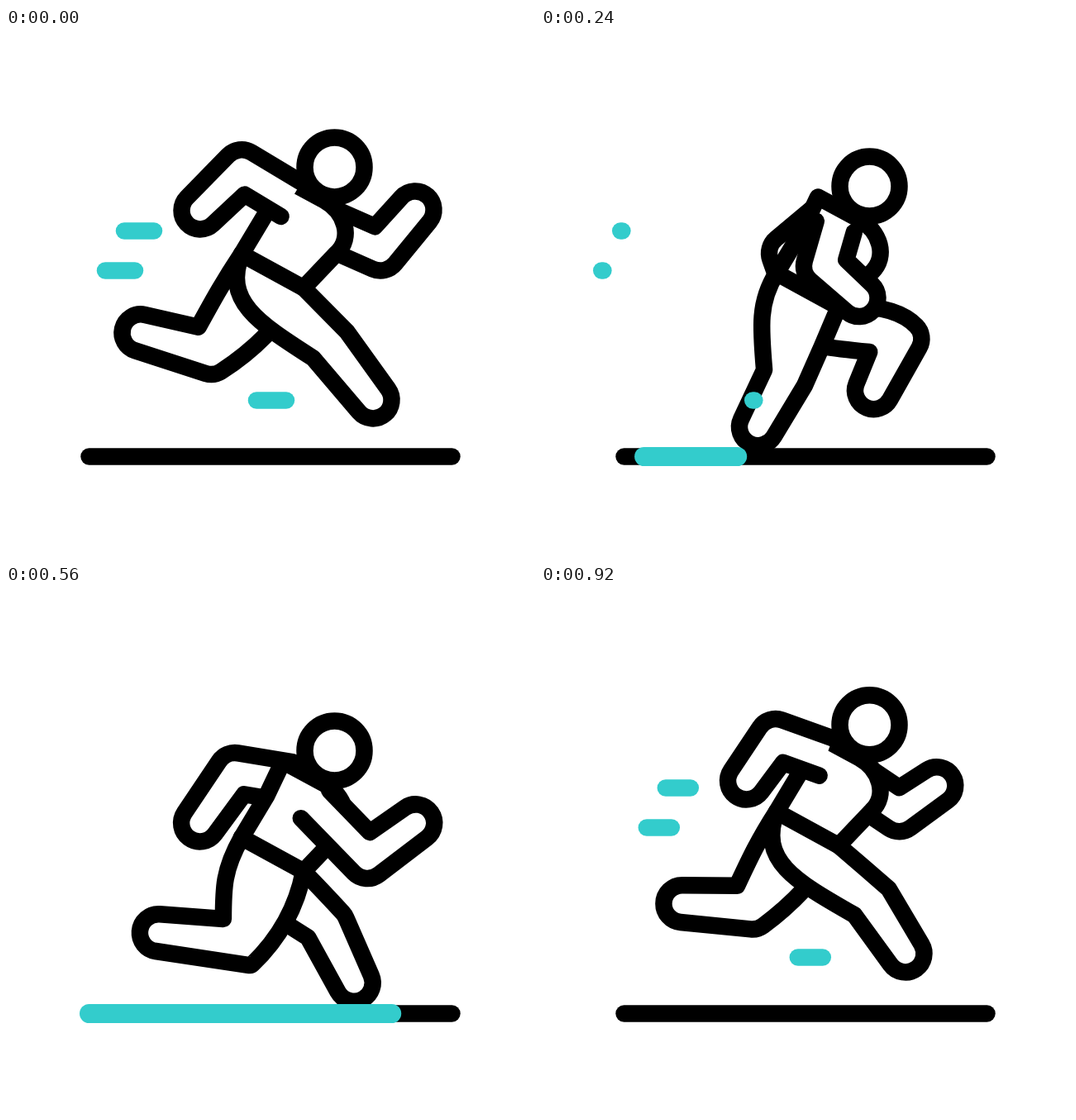
An HTML page with a canvas that plays this animation: 640 by 640 pixels, repeating every 960 ms.

```html
<!DOCTYPE html>
<html lang="en">
<head>
<meta charset="utf-8">
<title>Runner</title>
<style>
  html, body { margin: 0; width: 100%; height: 100%; overflow: hidden; background: #fff; }
  canvas { display: block; }
</style>
</head>
<body>
<canvas id="stage" width="640" height="640"></canvas>
<script>
const ctx = document.getElementById('stage').getContext('2d');
const LOOP = 960, STEP = 40, LINE = 20.5, TEAL = '#33cccc';

// A cyclic motion: mean value, then cosine and sine amplitude of each harmonic.
const wave = (mean, ...amps) => angle => amps.reduce((sum, amp, i) =>
  sum + amp * (i % 2 ? Math.sin : Math.cos)(angle * (1 + (i >> 1))), mean);
const path = (x, y) => angle => ({ x: x(angle), y: y(angle) });

// Both legs and both arms share one stride, half a loop apart.
const knee = path(wave(344, 75, -53, -23, 5, 0, 15.5, -4, -6),
                  wave(383, -10, 13, 4, 6, 6, -7.5, -1, -2));
const foot = path(wave(315, 142.5, -50, -14.5, -4, -2, 20, 3),
                  wave(426, 24, 21, -14, -5, 16.5, -1, -4, 1));
const elbow = path(wave(340, -84, 9, 24, 9, 0, -12, 5),
                   wave(249, -53, 1, -18.5, 2, 4, -6.5, -11.5, -2));
const hand = path(wave(359, -134, 13, 7, 3.5, 4, -21, -1, -1),
                  wave(274, -4, 3, -41, 0, 4.5, 2, -14, -7));
const bob = wave(24.6, -7.7, -0.2, -4.1, 8.8, -5.2, 1.4, -3.1, -0.7, -3.1, 0.6);

const hip = { x: 322, y: 292 }, hipBack = { x: 285, y: 272 }, hipFront = { x: 360, y: 313 };

const along = (p, v, k) => ({ x: p.x + v.x * k, y: p.y + v.y * k });
const mix = (p, q, k) => ({ x: p.x + (q.x - p.x) * k, y: p.y + (q.y - p.y) * k });

// Unit vector to the outer side of the bone from p to q.
function outward(p, q, turn) {
  const length = Math.hypot(q.x - p.x, q.y - p.y);
  return { x: turn * (p.y - q.y) / length, y: turn * (q.x - p.x) / length };
}

// Inner and outer corner where two bones of the given half width meet.
function bend(root, joint, end, width, turn) {
  const n1 = outward(root, joint, turn), n2 = outward(joint, end, turn);
  const cos = n1.x * n2.x + n1.y * n2.y;
  const reach = width / Math.max(0.5, 1 + cos);
  const miter = { x: n1.x + n2.x, y: n1.y + n2.y };
  return {
    inner: along(joint, miter, -reach),
    outer: along(joint, miter, reach),
    normal: n1, cos,
  };
}

// Round end of a limb, tangent to the lines from inner and to outer.
function tip(inner, center, radius, outer, turn) {
  const tangent = (p, side) => Math.atan2(p.y - center.y, p.x - center.x) + side
    * Math.acos(Math.min(1, radius / Math.hypot(p.x - center.x, p.y - center.y)));
  ctx.arc(center.x, center.y, radius, tangent(inner, turn), tangent(outer, -turn), turn < 0);
}

function shape(trace) {
  ctx.beginPath();
  trace();
  ctx.fill();
  ctx.stroke();
}

function drawArm(angle) {
  const e = elbow(angle), h = hand(angle), swing = e.x - 285;
  const shoulder = { x: 345 + 0.19 * swing, y: 206 + 0.17 * swing };
  const { inner, outer, normal } = bend(shoulder, e, h, 24, 1);
  const from = along(shoulder, normal, -24), to = along(shoulder, normal, 24);
  shape(() => {
    ctx.moveTo(from.x, from.y);
    ctx.lineTo(inner.x, inner.y);
    tip(inner, h, 22.5, outer, 1);
    ctx.arcTo(outer.x, outer.y, to.x, to.y, 23);
    ctx.lineTo(to.x, to.y);
  });
}

function drawLeg(angle, kneeRadius) {
  const k = knee(angle), f = foot(angle);
  const { inner, outer, normal, cos } = bend(hip, k, f, 26, -1);
  const lift = (inner.x - hipBack.x + 150) / (inner.y - hipBack.y);
  const seat = { x: hipBack.x - 22, y: hipBack.y + 30 * lift };
  const ham = mix(seat, inner, 0.37);
  const thigh = along(mix(outer, hipFront, 0.5), normal, 28 * (1 - cos));
  shape(() => {
    ctx.moveTo(hipBack.x, hipBack.y);
    ctx.bezierCurveTo(seat.x, seat.y, ham.x, ham.y, inner.x, inner.y);
    tip(inner, f, 22.5, outer, -1);
    ctx.arcTo(outer.x, outer.y, thigh.x, thigh.y, kneeRadius);
    ctx.quadraticCurveTo(thigh.x, thigh.y, hipFront.x, hipFront.y);
  });
}

function drawTorso() {
  shape(() => {
    ctx.moveTo(335, 180);
    ctx.lineTo(385, 207);
    ctx.bezierCurveTo(410, 221, 420, 252, 400, 271);
    ctx.lineTo(hipFront.x, hipFront.y);
    ctx.lineTo(hipBack.x, hipBack.y);
    ctx.lineTo(315, 222);
    ctx.closePath();
  });
}

function drawRunner(angle) {
  ctx.save();
  ctx.translate(0, bob(angle));
  ctx.lineWidth = LINE;
  ctx.strokeStyle = '#000';
  ctx.fillStyle = '#fff';
  drawArm(angle + Math.PI);
  drawLeg(angle + Math.PI, 22);
  drawLeg(angle, 4);
  drawTorso();
  drawArm(angle);
  shape(() => ctx.arc(397.5, 167, 36, 0, 2 * Math.PI));
  ctx.restore();
}

function bar(x1, x2, y, color, width) {
  ctx.strokeStyle = color;
  ctx.lineWidth = width;
  ctx.beginPath();
  ctx.moveTo(x1, y);
  ctx.lineTo(x2, y);
  ctx.stroke();
}

// Teal dashes sweep the ground: both ends run from right to left, one after the other.
function drawGround(t) {
  const left = 100.5, right = 539.5, y = 518.5;
  const sweep = (from, to) =>
    right - (right - left) * Math.min(1, Math.max(0, (t - from) / (to - from)));
  const dash = (headStart, headEnd, tailStart, tailEnd) => {
    const head = sweep(headStart, headEnd), tail = sweep(tailStart, tailEnd);
    if (tail > head) bar(head, tail, y, TEAL, 23);
  };
  bar(left, right, y, '#000', LINE);
  dash(85, 249, 130, 290);
  dash(260, 430, 330, 512);
  dash(360, 538, 530, 711);
  dash(604, 937, 680, 914);
}

// Three streaks grow around the leap, then shrink while drifting left.
function drawStreaks(t) {
  const age = t < LOOP / 2 ? t : t - LOOP;
  if (age < -220 || age > 250) return;
  const x1 = 143 - 0.195 * age;
  const x2 = 179 - (age < 0 ? 0.045 : 0.336) * age;
  for (const [dx, y] of [[0, 245.5], [-23, 293.5], [160, 450.5]]) {
    bar(x1 + dx, x2 + dx, y, TEAL, LINE);
  }
}

function draw(t) {
  ctx.clearRect(0, 0, 640, 640);
  ctx.lineCap = ctx.lineJoin = 'round';
  drawRunner(2 * Math.PI * t / LOOP);
  drawGround(t);
  drawStreaks(t);
}

const start = performance.now();
function tick() {
  const elapsed = (performance.now() - start) % LOOP;
  draw(Math.floor(elapsed / STEP) * STEP);
  requestAnimationFrame(tick);
}
tick();
</script>
</body>
</html>
```
